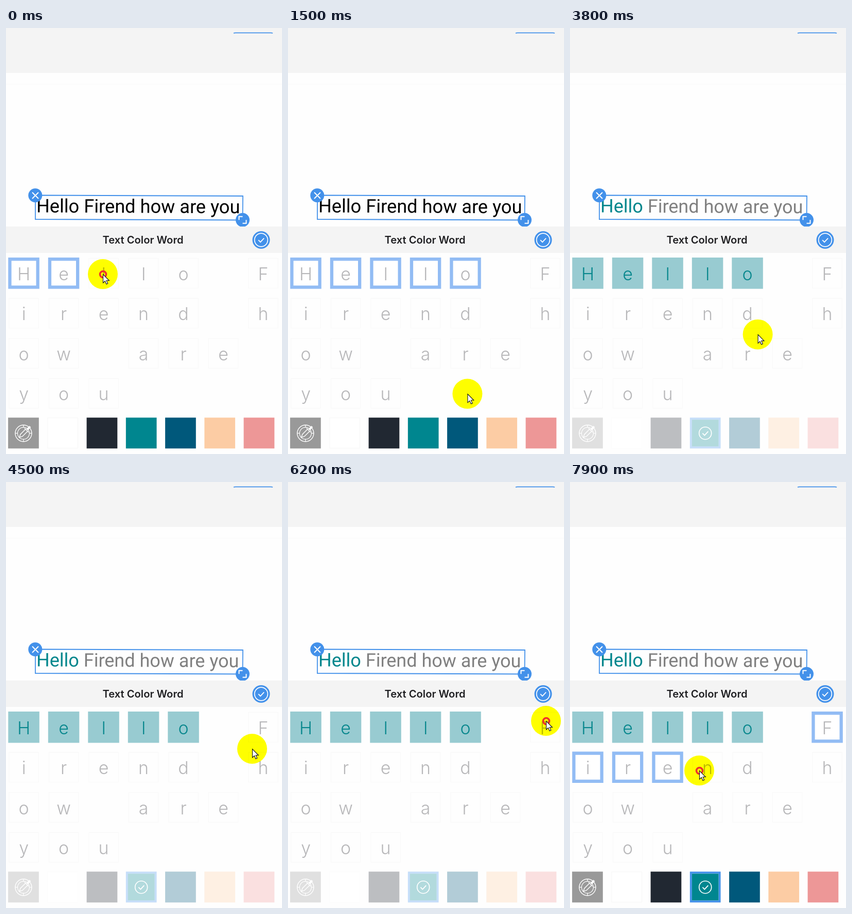
These frames come from a looping animation (536 px wide and 824 px high, 8000 ms). An HTML page with a canvas:

```html
<!DOCTYPE html>
<html lang="en">
<head>
<meta charset="utf-8">
<title>Text Color Word</title>
<style>
html, body { margin: 0; width: 100%; height: 100%; overflow: hidden; background: #fefefe; }
canvas { display: block; width: 536px; height: 824px; }
</style>
</head>
<body>
<canvas id="stage" width="536" height="824"></canvas>
<script>
const ctx = document.getElementById('stage').getContext('2d');
const LOOP = 8, FPS = 10, PRESS = 0.1;
const BLUE = '#4391ea', TEAL = '#00868c';
const PHRASE = 'Hello Firend how are you';
const SWATCHES = ['#999999', '#ffffff', '#212832', '#00868f', '#00587b', '#fccca4', '#ed9797'];
const GRID = { x: 4.3, y: 444, pitch: 77.5, size: 60.5, cols: 7 };
const PALETTE = { x: 4.1, y: 753.6, pitch: 76.25, size: 59.7 };

// Pointer stops in seconds and pixels; the pointer glides between them.
const tap = (t, x, y) => ({ t, x, y, press: PRESS });
const pass = (t, x, y) => ({ t, x, y, press: 0 });
const STOPS = [
  tap(0, 188, 476), tap(0.4, 267, 470), pass(0.7, 352, 466), tap(0.9, 352, 466),
  pass(1.3, 430, 630), pass(1.7, 267, 785), tap(1.9, 267, 785),
  pass(2.6, 349, 606), pass(3.7, 349, 606), pass(4.2, 499, 478), pass(4.5, 478, 516),
  pass(5.5, 378, 556), tap(6.2, 501, 462), tap(6.8, 23, 549),
  tap(7.3, 110, 558), tap(7.6, 187, 564), tap(7.9, 251, 558)
];

// Taps decide which letters get framed and when the palette changes.
const TAPS = STOPS.filter(s => s.press);
const cellAt = ({ x, y }) =>
  Math.floor((x - GRID.x) / GRID.pitch) + GRID.cols * Math.floor((y - GRID.y) / GRID.pitch);
const APPLY = TAPS.find(s => s.y > PALETTE.y).t + PRESS;
const RESELECT = TAPS.find(s => s.t > APPLY).t + PRESS;
const pickedAt = { 0: 0, 1: 0 };
for (const s of TAPS) if (s.y < PALETTE.y) pickedAt[cellAt(s)] = s.t + PRESS;

function rect(x, y, w, h, color) {
  ctx.fillStyle = color;
  ctx.fillRect(x, y, w, h);
}

function frame(x, y, size, color, width) {
  ctx.strokeStyle = color;
  ctx.lineWidth = width;
  ctx.strokeRect(x + width / 2, y + width / 2, size - width, size - width);
}

function disc(x, y, r, color) {
  ctx.fillStyle = color;
  ctx.beginPath();
  ctx.arc(x, y, r, 0, Math.PI * 2);
  ctx.fill();
}

function ring(x, y, r, color, width) {
  ctx.strokeStyle = color;
  ctx.lineWidth = width;
  ctx.beginPath();
  ctx.arc(x, y, r, 0, Math.PI * 2);
  ctx.stroke();
}

// Strokes an SVG path placed at x, y.
function line(x, y, d, color, width, fill) {
  const path = new Path2D(d);
  ctx.save();
  ctx.translate(x, y);
  if (fill) {
    ctx.fillStyle = fill;
    ctx.fill(path);
  }
  ctx.strokeStyle = color;
  ctx.lineWidth = width;
  ctx.stroke(path);
  ctx.restore();
}

function text(str, x, y, font, color, align) {
  ctx.font = font;
  ctx.textAlign = align;
  ctx.fillStyle = color;
  ctx.fillText(str, x, y);
}

function drawHeader() {
  rect(0, 0, 536, 87, '#f4f4f4');
  rect(0, 108, 536, 1, '#f9f9f9');
  line(442, 9.3, 'M0 .8Q1 0 4 0H72Q75 0 76 .8', BLUE, 1.7);
}

function drawPhrase(t) {
  const colored = t >= APPLY;
  const font = `${colored ? 36 : 36.2}px Roboto, sans-serif`;
  const word = PHRASE.slice(0, 5), rest = PHRASE.slice(5);
  ctx.save();
  ctx.translate(59, 356.6);
  ctx.rotate(0.0045);
  text(word, 0, 0, font, colored ? TEAL : '#000', 'left');
  text(rest, ctx.measureText(word).width, 0, font, colored ? '#808080' : '#000', 'left');
  ctx.restore();

  line(57, 323.5, 'M0 0L403 1.5L402.5 48L0 46.5Z', BLUE, 1.8);
  disc(56.8, 323.8, 13.5, BLUE);
  line(57, 324, 'M-6 -6L6 6M6 -6L-6 6', '#fff', 2);
  disc(459.5, 371.2, 13.5, BLUE);
  line(459.5, 371.2, 'M-7 0V-6.5H0M7 0V6.5H0', '#fff', 2);
}

function drawBar() {
  rect(0, 384, 536, 51, '#f4f4f4');
  text('Text Color Word', 266, 417, '600 20.2px Inter, sans-serif', '#1f1f22', 'center');
  disc(495.5, 410, 17, BLUE);
  drawCheck(495.5, 410, 12.8);
}

function drawCheck(x, y, r) {
  ring(x, y, r, '#fff', 1.7);
  line(x, y, 'M-5.3 .2L-1.4 4.1L5.6 -3.4', '#fff', 1.8);
}

function drawLetters(t) {
  const { size, pitch, cols } = GRID;
  [...PHRASE].forEach((ch, i) => {
    if (ch === ' ') return;
    const x = GRID.x + (i % cols) * pitch, y = GRID.y + Math.floor(i / cols) * pitch;
    const done = i < 5 && t >= APPLY;
    if (done) {
      rect(x, y, size, size, '#98cbd1');
    } else if (t >= pickedAt[i]) {
      rect(x, y, size, size, '#fff');
      frame(x, y, size, '#92bcf4', 6.3);
    } else {
      frame(x + 1, y + 1, size - 2, '#f8f8f8', 1);
    }
    text(ch, x + 30.3, y + 43.5, '300 34px Inter, sans-serif', done ? '#08878d' : '#b7b7b9', 'center');
  });
}

function drawPicker(x, y) {
  ring(x, y, 16, '#fff', 1.4);
  ring(x, y, 11.5, '#fff', 1.2);
  line(x, y, 'M-16 0H-11.5M11.5 0H16M0 11.5V16M0 -16V-11.5', '#fff', 1.2);
  line(x, y, 'M-8 8L-6 2L4 -8L8 -4L-2 6ZM2 -10L10 -2', '#fff', 1.4);
  line(x, y, 'M7 -7L13 -13', '#fff', 4);
}

function drawSwatches(t) {
  const { y, size } = PALETTE;
  const applied = t >= APPLY, idle = applied && t < RESELECT;
  SWATCHES.forEach((color, i) => {
    const x = PALETTE.x + i * PALETTE.pitch, mid = size / 2;
    const chosen = applied && i === 3, inset = chosen ? 4 : 0;
    ctx.globalAlpha = idle ? 0.3 : 1;
    if (chosen) frame(x, y, size, BLUE, inset);
    rect(x + inset, y + inset, size - 2 * inset, size - 2 * inset, color);
    if (i === 1) frame(x, y, size, '#f6f6f6', 1);
    ctx.globalAlpha = 1;
    if (i === 0) drawPicker(x + mid, y + mid + 0.5);
    if (chosen) drawCheck(x + mid, y + mid + 0.3, 12);
  });
}

function pointerAt(t) {
  const i = STOPS.findLastIndex(s => s.t <= t + 1e-6);
  const a = STOPS[i], b = STOPS[i + 1] || a;
  const start = a.t + a.press;
  const k = Math.max(0, Math.min(1, (t - start) / (b.t - start)));
  const ease = k * k * (3 - 2 * k);
  return {
    x: a.x + (b.x - a.x) * ease,
    y: a.y + (b.y - a.y) * ease,
    pressed: t < start - 1e-6
  };
}

function drawPointer(t) {
  const { x, y, pressed } = pointerAt(t);
  ctx.globalCompositeOperation = 'multiply';
  disc(x, y, 29, '#ffff00');
  ctx.globalCompositeOperation = 'source-over';
  if (pressed) ring(x + 0.5, y + 0.5, 6, '#f0302c', 3.6);
  line(x + 0.5, y + 0.5, 'M0 0V16.5L3.8 13L6.5 19L9.2 17.8L6.6 12H11.8Z', '#111', 1.1, '#fff');
}

function draw(t) {
  rect(0, 0, 536, 824, '#fefefe');
  drawHeader();
  drawPhrase(t);
  drawBar();
  drawLetters(t);
  drawSwatches(t);
  drawPointer(t);
}

const begin = performance.now();
function tick() {
  const t = ((performance.now() - begin) / 1000) % LOOP;
  draw(Math.floor(t * FPS) / FPS + 1e-4);
  requestAnimationFrame(tick);
}
tick();
</script>
</body>
</html>
```
